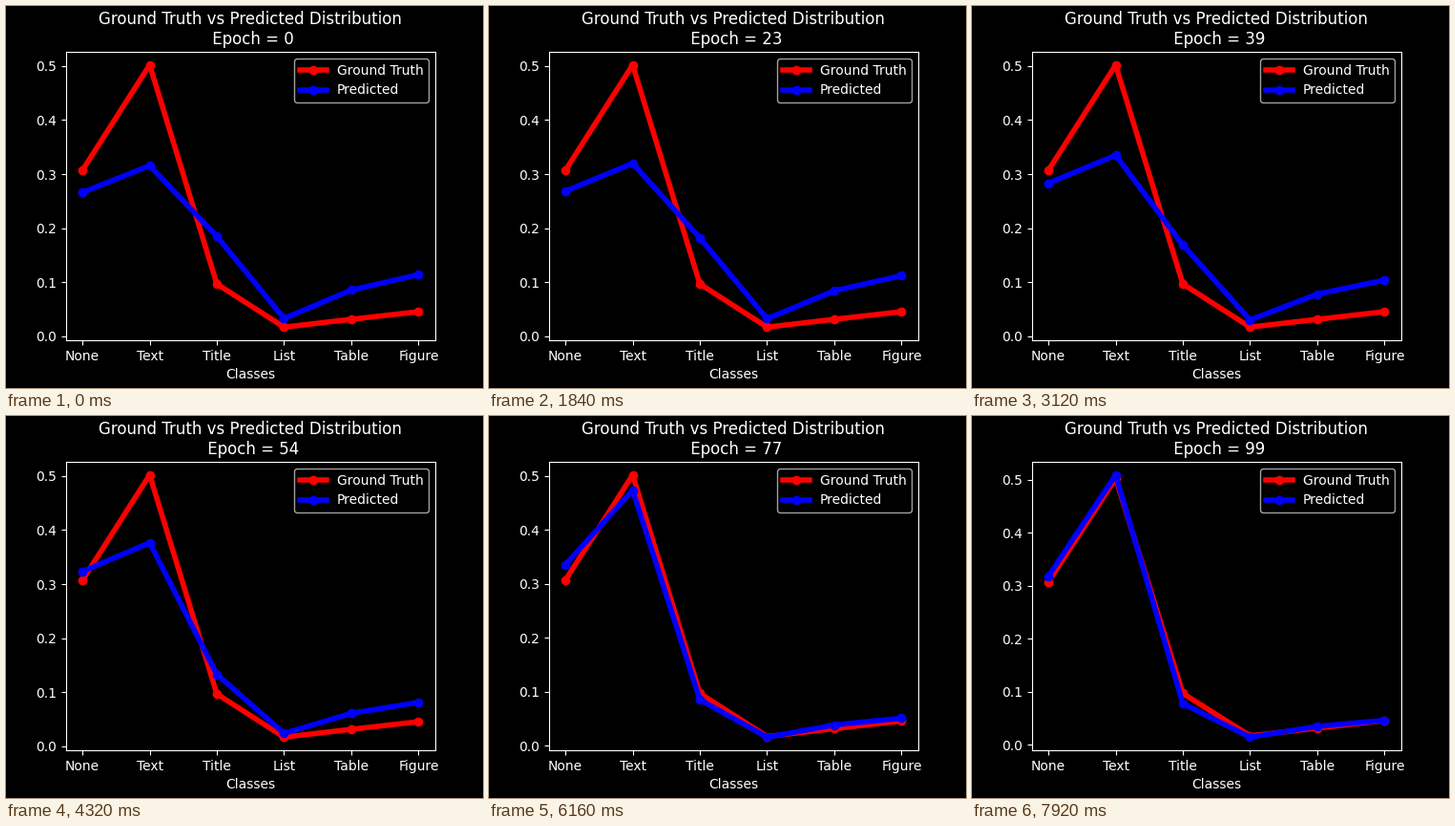
Write a matplotlib script that moves like this. It is 500 by 400 pixels and loops after 8 s.

```python
import numpy as np
import matplotlib.pyplot as plt
from matplotlib.animation import FuncAnimation

EPOCHS = 100
CLASSES = ["None", "Text", "Title", "List", "Table", "Figure"]
TRUTH = [0.3072, 0.5020, 0.0970, 0.0171, 0.0316, 0.0457]

# Predicted shares of Title, List, Table and Figure before and after training.
RARE_START = np.array([0.1852, 0.0332, 0.0858, 0.1143])
RARE_END = np.array([0.0768, 0.0144, 0.0345, 0.0458])
TEXT_START, TEXT_END = 0.3152, 0.5152


def logistic(epoch, center, width):
    return 1 / (1 + np.exp((center - epoch) / width))


def predicted(epoch):
    """Rare classes shrink, Text grows later, None takes the remainder."""
    rare = RARE_START + (RARE_END - RARE_START) * logistic(epoch, 54.7, 9)
    text = TEXT_START + (TEXT_END - TEXT_START) * logistic(epoch, 62.7, 10.7)
    return [1 - text - rare.sum(), text, *rare]


plt.style.use("dark_background")
fig, ax = plt.subplots(figsize=(5, 4), dpi=100)
fig.subplots_adjust(left=0.125, right=0.9, bottom=0.125, top=0.88)

style = dict(marker="o", linewidth=4)
ax.plot(CLASSES, TRUTH, color="red", label="Ground Truth", **style)
pred_line, = ax.plot(CLASSES, predicted(0), color="blue",
                     label="Predicted", **style)
ax.set_xlabel("Classes")
ax.legend(loc="upper right")


def update(epoch):
    pred_line.set_ydata(predicted(epoch))
    ax.relim()
    ax.autoscale_view()
    ax.set_title(f"Ground Truth vs Predicted Distribution\n Epoch = {epoch}")
    return pred_line, ax.title


anim = FuncAnimation(fig, update, frames=EPOCHS, interval=80,
                     repeat=True, repeat_delay=0)
plt.show()
```
